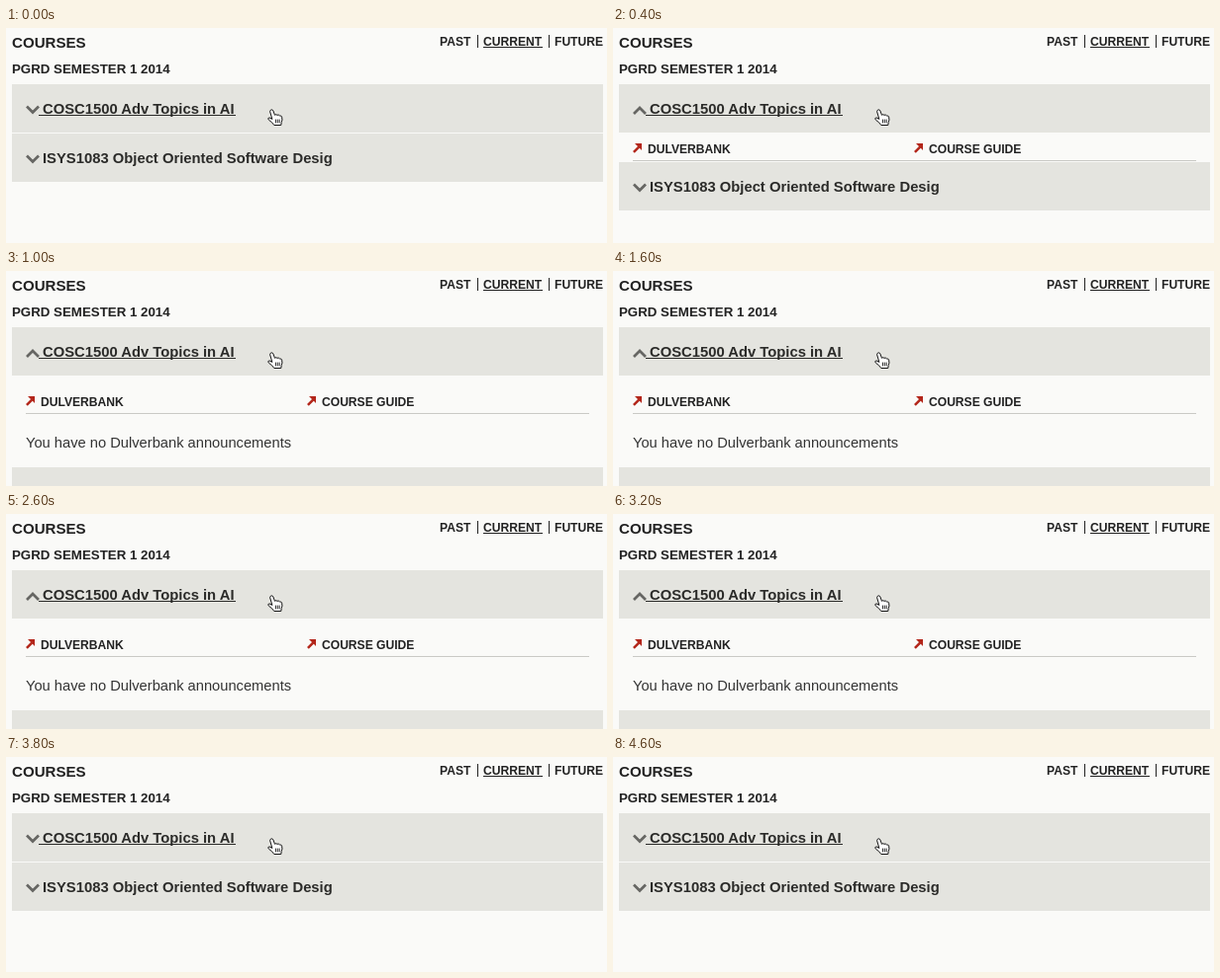
Recreate the animation shown at these times as an HTML page. Size 607 by 218 pixels, loop 4.8 s.

```html
<!DOCTYPE html>
<html lang="en">
<head>
<meta charset="utf-8">
<title>Courses</title>
<style>
  html, body { margin: 0; width: 100%; height: 100%; overflow: hidden; background: #fafaf8; }
  svg { display: block; width: 607px; height: 218px; }
  text { font-family: "Liberation Sans", Arial, sans-serif; font-weight: bold; fill: #222; white-space: pre; }
  .head { font-size: 15.1px; }
  .term { font-size: 13.3px; }
  .small { font-size: 12.1px; }
  .title { font-size: 14.8px; fill: #2b2b29; }
  .note { font-size: 14.7px; font-weight: normal; fill: #333; }
  .panel { fill: #e4e4df; }
  .chevron { fill: none; stroke: #666663; stroke-width: 2.7; }
</style>
</head>
<body>
<svg viewBox="0 0 607 218">
  <defs>
    <g id="arrow" fill="#b3261a">
      <path d="M22 -5H29V2L26.8 -.2L21.8 4.8L20 3L25 -2Z"/>
    </g>
  </defs>
  <rect width="607" height="218" fill="#fafaf8"/>

  <text class="head" x="6" y="20">COURSES</text>
  <text class="term" x="6" y="46">PGRD SEMESTER 1 2014</text>
  <text class="small" x="438" y="18">PAST</text>
  <text class="small" x="482" y="18">CURRENT</text>
  <text class="small" x="554" y="18">FUTURE</text>
  <path d="M476.5 7V20M548.5 7V20M482 19.5H542" stroke="#222"/>

  <g id="links">
    <use href="#arrow" y="132"/>
    <text class="small" x="35" y="137">DULVERBANK</text>
    <use href="#arrow" x="284" y="132"/>
    <text class="small" x="319" y="137">COURSE GUIDE</text>
    <path d="M20 144.5H589" stroke="#c9c9c5"/>
    <text class="note" x="20" y="179">You have no Dulverbank announcements</text>
  </g>

  <g id="next">
    <rect x="6" y="106" width="597" height="112" fill="#fafaf8"/>
    <rect class="panel" x="6" y="107" width="597" height="49"/>
    <path class="chevron" d="M21 129.5L27 135.5L33 129.5"/>
    <text class="title" x="37" y="137">ISYS1083 Object Oriented Software Desig</text>
  </g>

  <rect class="panel" x="6" y="57" width="597" height="49"/>
  <path id="toggle" class="chevron"/>
  <text class="title" x="37" y="87">COSC1500 Adv Topics in AI</text>
  <path d="M33 88.5H232" stroke="#2b2b29"/>

  <g transform="translate(264 82)" stroke="#111" stroke-linejoin="round" stroke-linecap="round">
    <path fill="#fff" d="M2.7 2.4Q3 .8 4.3 .8Q5.4 .8 5.9 2L7.5 6.3Q8.8 5.1 10 6.3Q11.4 5.4 12.3 6.9Q14 6.4 14.6 8.2Q15.5 11.3 14.2 13.6L13.8 16.5H6.8Q5 13.5 1.6 11.4Q0 9.8 1.4 9Q2.6 8.6 4.6 10.2Z"/>
    <path fill="none" stroke-width=".9" d="M8.4 11V14M10.3 11V14M12.2 11V14"/>
  </g>
</svg>
<script>
  const LOOP = 4800;
  const DOWN = "M21 79.5L27 85.5L33 79.5";
  const UP = "M21 87L27 81L33 87";

  // Each step: start time, slide of the next course, shift of the links, chevron.
  const steps = [
    { at: 0, slide: 0, shift: -29, mark: DOWN },
    { at: 400, slide: 29, shift: -10, mark: UP },
    { at: 600, slide: 92, shift: 0, mark: UP },
    { at: 3600, slide: 79, shift: -2, mark: DOWN },
    { at: 3800, slide: 0, shift: -29, mark: DOWN }
  ];

  const get = id => document.getElementById(id);
  const links = get("links"), next = get("next"), toggle = get("toggle");
  const moveY = (el, y) => el.setAttribute("transform", `translate(0 ${y})`);

  function draw(time) {
    const t = time % LOOP;
    const step = steps.filter(s => s.at <= t).pop();
    moveY(links, step.shift);
    moveY(next, step.slide);
    links.style.display = step.slide ? "" : "none";
    toggle.setAttribute("d", step.mark);
  }

  const start = performance.now();
  function tick() {
    draw(performance.now() - start);
    requestAnimationFrame(tick);
  }
  tick();
</script>
</body>
</html>
```
